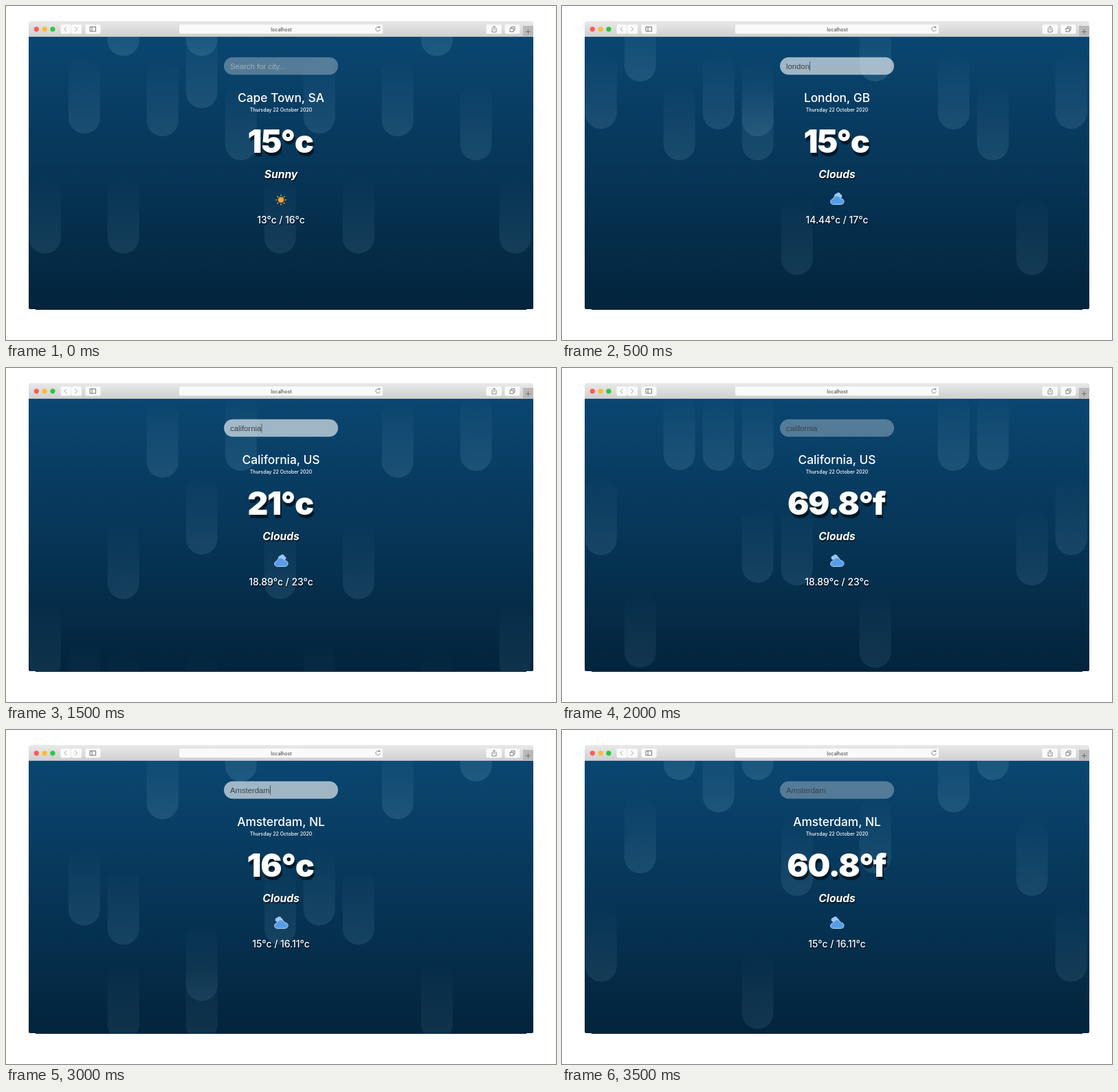
Recreate the animation shown at these times as an HTML page with a canvas. Size 800 px wide and 487 px high, loop 4 s.

```html
<!DOCTYPE html>
<html lang="en">
<head>
<meta charset="utf-8">
<title>Weather</title>
<style>
html, body { margin: 0; width: 100%; height: 100%; overflow: hidden; background: #fff; }
canvas { display: block; width: 800px; height: 487px; }
</style>
</head>
<body>
<canvas id="stage"></canvas>
<script>
const canvas = document.getElementById('stage');
const ctx = canvas.getContext('2d');
const ratio = window.devicePixelRatio || 1;
canvas.width = 800 * ratio;
canvas.height = 487 * ratio;

const STEP = 500;
const SANS = 'Inter, sans-serif';
const INPUT_FONT = '11.3px "Liberation Sans", Arial, sans-serif';
const DROP_WIDTH = 46;
const DROP_HEIGHT = 114;

const capeTown = { city: 'Cape Town, SA', temp: '15°c', sky: 'Sunny', range: '13°c / 16°c', query: '' };
const london = { city: 'London, GB', temp: '15°c', sky: 'Clouds', range: '14.44°c / 17°c', query: 'london' };
const california = { city: 'California, US', temp: '21°c', sky: 'Clouds', range: '18.89°c / 23°c', query: 'california' };
const tripoli = { city: 'Tripoli, LY', temp: '26°c', sky: 'Clear', range: '25.96°c / 25.96°c', query: 'Tripoli' };
const amsterdam = { city: 'Amsterdam, NL', temp: '16°c', sky: 'Clouds', range: '15°c / 16.11°c', query: 'Amsterdam' };

const scenes = [
  capeTown,
  { ...london, focus: true },
  london,
  { ...california, focus: true },
  { ...california, temp: '69.8°f', left: true },
  { ...tripoli, focus: true, misspelt: true },
  { ...amsterdam, focus: true, left: true },
  { ...amsterdam, temp: '60.8°f', left: true }
];

// Drops of a lane fall together: they move by `pace` each step and wrap after `span`.
const lanes = [
  { columns: [0, 12], start: 361, pace: -182, span: 640 },
  { columns: [1, 7], start: 186, pace: -76, span: 555 },
  { columns: [2, 6, 8], start: 361, pace: 272, span: 840 },
  { columns: [3, 9], start: 190, pace: -10, span: 640 },
  { columns: [2, 4, 10], start: 73, pace: 152, span: 532 },
  { columns: [4], start: 149, pace: 41, span: 640 },
  { columns: [5, 11], start: 225, pace: 167, span: 576 }
];

const wrap = (value, span) => ((value % span) + span) % span;

function box(x, y, w, h, radius, fill) {
  ctx.beginPath();
  ctx.roundRect(x, y, w, h, radius);
  ctx.fillStyle = fill;
  ctx.fill();
}

function dot(x, y, r, fill) {
  ctx.beginPath();
  ctx.arc(x, y, r, 0, Math.PI * 2);
  ctx.fillStyle = fill;
  ctx.fill();
}

function stroke(path, color, width = 0.9) {
  ctx.strokeStyle = color;
  ctx.lineWidth = width;
  ctx.stroke(new Path2D(path));
}

function vertical(y0, y1, from, to) {
  const gradient = ctx.createLinearGradient(0, y0, 0, y1);
  gradient.addColorStop(0, from);
  gradient.addColorStop(1, to);
  return gradient;
}

function label(text, x, y, font, color, { align = 'center', spacing = 0, shadow } = {}) {
  ctx.save();
  ctx.font = font;
  ctx.textAlign = align;
  ctx.letterSpacing = spacing + 'px';
  if (shadow) {
    const [dx, dy, blur, tint] = shadow;
    ctx.shadowOffsetX = dx * ratio;
    ctx.shadowOffsetY = dy * ratio;
    ctx.shadowBlur = blur * ratio;
    ctx.shadowColor = tint;
  }
  ctx.fillStyle = color;
  ctx.fillText(text, x, y);
  ctx.restore();
}

function drawToolbar() {
  box(33, 22, 734, 23, [4, 4, 0, 0], vertical(22, 45, '#e9e9e9', '#cfcfcf'));
  box(33, 44, 734, 1, 0, '#b5bcc1');
  ['#fc5b57', '#fdbb30', '#2bc840'].forEach((color, i) => dot(44.3 + 11.8 * i, 33.8, 3.6, color));

  const buttons = [[79.5, 15], [95, 15], [115.5, 22], [698.5, 22.5], [725.5, 22]];
  for (const [x, w] of buttons) box(x, 27, w, 13.5, 2, '#fafafa');
  box(252, 27, 296, 13.3, 2, '#fafafa');
  box(752, 29, 15, 16, 0, '#b9b9b9');

  stroke('M88 30.5L85 33.8L88 37 M100.5 30.5L103.5 33.8L100.5 37', '#999');
  stroke('M122 30.5H130.5V37H122Z M125 30.5V37', '#666');
  stroke('M708 32.5H707V38H713V32.5H712 M710 35.5V29.5 M708 31.3L710 29.3L712 31.3', '#666', 0.8);
  stroke('M733 32.5H738V37.5H733Z M735 32.5V30.3H740V35.3H738', '#666', 0.8);
  stroke('M543.3 31.3A3.2 3.2 0 1 0 544.2 34 M541.2 31.5H543.7V29', '#777', 0.8);
  stroke('M759.5 34V41 M756 37.5H763', '#6a6a6a');
  label('localhost', 400.5, 36.5, '500 7px ' + SANS, '#505050');
}

function drawDrop(column, bottom) {
  const x = 33.7 + 57 * column;
  const top = bottom - DROP_HEIGHT;
  const alpha = 0.16 - 0.00015 * (bottom - 45);
  box(x, top, DROP_WIDTH, DROP_HEIGHT, DROP_WIDTH / 2,
    vertical(top, bottom, 'rgba(150,205,230,0)', `rgba(150,205,230,${alpha})`));
}

function drawRain(step) {
  ctx.save();
  box(43, 442, 714, 1, 0, '#03243c');
  box(33, 45, 734, 397, [0, 0, 2, 2], vertical(45, 442, '#0a4671', '#03243c'));
  ctx.clip();
  for (const { columns, start, pace, span } of lanes) {
    const bottom = wrap(start + pace * step, span);
    for (const column of columns) drawDrop(column, bottom);
  }
  ctx.restore();
}

function drawSearch({ query, focus, misspelt }) {
  box(317, 74.7, 166, 25.5, 12.75, focus ? 'rgba(255,255,255,.61)' : 'rgba(255,255,255,.3)');
  label(query || 'Search for city...', 326, 91.8, INPUT_FONT, query ? '#3c4247' : '#a9adb1', { align: 'left' });
  if (!focus) return;
  ctx.font = INPUT_FONT;
  const end = 326 + ctx.measureText(query).width;
  box(end + 0.3, 81, 0.8, 13.5, 0, '#33414d');
  if (misspelt) box(326, 94, end - 326, 0.7, 0, 'rgba(80,80,90,.6)');
}

function drawSun() {
  dot(400, 282.7, 4.1, '#f5a52f');
  for (let i = 0; i < 8; i++) {
    ctx.save();
    ctx.translate(400, 282.7);
    ctx.rotate(i * Math.PI / 4);
    box(-0.8, -7.8, 1.6, 2.4, 0.8, '#f0a236');
    ctx.restore();
  }
}

function drawCloud(left) {
  const cloud = new Path2D('M394.5 289.3C389.3 289.3 389.3 281.6 394.3 281.6C395 275.4 403.6 275 405.3 280.9C411.6 280.4 411.6 289.3 405.5 289.3Z');
  const backX = left ? 397 : 401.5;
  dot(backX - 2.4, 276.7, 3, '#9cc6f2');
  dot(backX + 0.5, 275, 3.1, '#9cc6f2');
  dot(backX + 3, 277.3, 2.8, '#9cc6f2');
  ctx.fillStyle = '#559de9';
  ctx.fill(cloud);
  ctx.strokeStyle = '#b9d8f8';
  ctx.lineWidth = 1;
  ctx.stroke(cloud);
}

function drawWeather({ city, temp, sky, range, left }) {
  const soft = [1, 1.5, 1, 'rgba(0,0,0,.6)'];
  label(city, 400, 139.6, '500 17.3px ' + SANS, '#fff');
  label('Thursday 22 October 2020', 400, 154, '500 7px ' + SANS, '#fff');
  label(temp, 399, 213.5, '900 46.5px ' + SANS, '#fff',
    { spacing: -1.3, shadow: [2, 5.5, 0, 'rgba(0,12,20,.72)'] });
  label(sky, 400, 251, 'italic 700 15.6px ' + SANS, '#fff', { shadow: soft });
  if (sky === 'Clouds') drawCloud(left);
  else drawSun();
  label(range, 400, 317.4, '500 13.8px ' + SANS, '#fff', { shadow: soft });
}

function draw(step) {
  const scene = scenes[step];
  ctx.setTransform(ratio, 0, 0, ratio, 0, 0);
  ctx.fillStyle = '#fff';
  ctx.fillRect(0, 0, 800, 487);
  drawRain(step);
  drawToolbar();
  drawSearch(scene);
  drawWeather(scene);
}

const start = performance.now();
function tick() {
  draw(Math.floor((performance.now() - start) / STEP) % scenes.length);
  requestAnimationFrame(tick);
}
tick();
</script>
</body>
</html>
```
